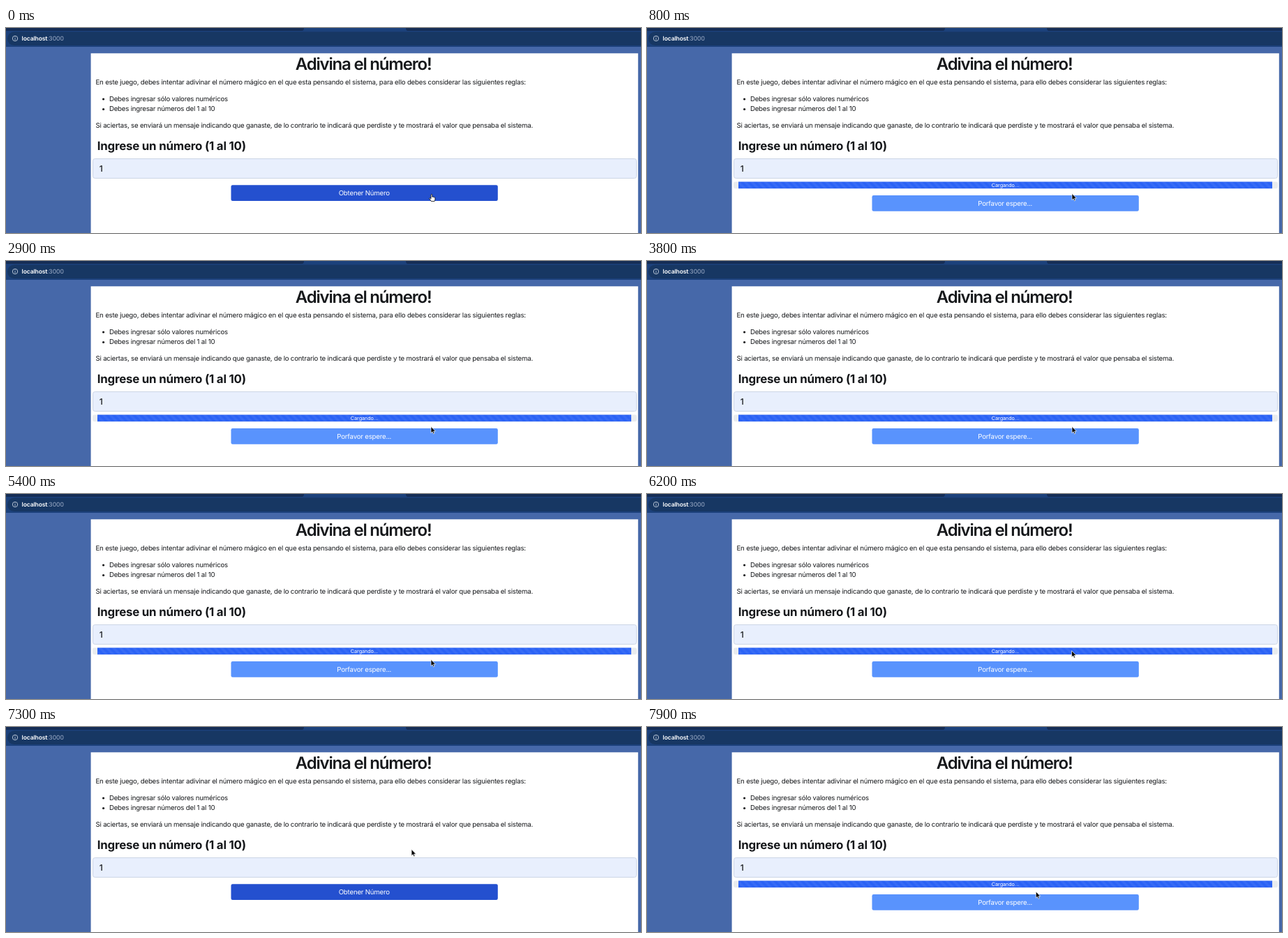
Recreate the animation shown at these times as an HTML page. Size 910 by 294 pixels, loop 8000 ms.

```html
<!DOCTYPE html>
<html lang="es">
<head>
<meta charset="utf-8">
<title>Adivina el número</title>
<style>
  html, body { margin: 0; width: 100%; height: 100%; overflow: hidden; background: #4668a9; }
  svg { display: block; width: 910px; height: 294px; }
  text {
    font-family: Inter, "Liberation Sans", sans-serif;
    font-size: 9.67px; letter-spacing: -.2px; fill: #16181b;
    font-optical-sizing: none; text-rendering: geometricPrecision;
  }
  .title { font-size: 24px; font-weight: 600; letter-spacing: -1.2px; }
  .label { font-size: 16.9px; font-weight: 700; letter-spacing: -.23px; }
  .value { font-size: 12.1px; font-weight: 500; }
  .white { fill: #fff; }
  .small { font-size: 7.25px; letter-spacing: -.07px; }
  .url { font-size: 8.6px; letter-spacing: -.15px; }
  .host { fill: #fff; font-weight: 600; }
  .port { fill: #a3b2cc; letter-spacing: .04px; }
</style>
</head>
<body>
<svg viewBox="0 0 910 294">
  <defs>
    <pattern id="stripes" width="9.67" height="9.67" patternUnits="userSpaceOnUse">
      <path d="M0 0L9.67 9.67H4.835L0 4.835ZM4.835 0H9.67V4.835Z" fill="#fff" fill-opacity=".055"/>
    </pattern>
  </defs>

  <!-- browser bar -->
  <rect width="910" height="27" fill="#1c417b"/>
  <rect width="910" height="4" fill="#152d55"/>
  <path d="M424 4Q427 4 427 0H573Q573 4 576 4Z" fill="#1c417b"/>
  <rect x="2" y="5.5" width="920" height="19.5" rx="9.7" fill="#173763"/>
  <g fill="none" stroke="#c3cede" stroke-width=".9">
    <circle cx="13" cy="15" r="3.7"/>
    <path d="M13 14.4V17.2M13 12.6V13.5"/>
  </g>
  <text class="url host" x="22.6" y="18">localhost</text>
  <text class="url port" x="58.8" y="18">:3000</text>

  <!-- page -->
  <rect x="121.6" y="36.3" width="784.2" height="258" fill="#fff"/>
  <text class="title" x="414.8" y="59.6">Adivina el número!</text>
  <text x="128.5" y="80.6">En este juego, debes intentar adivinar el número mágico en el que esta pensando el sistema, para ello debes considerar las siguientes reglas:</text>
  <circle cx="139.6" cy="102" r="1.6" fill="#16181b"/>
  <text x="147.9" y="104.9">Debes ingresar sólo valores numéricos</text>
  <circle cx="139.6" cy="116.5" r="1.6" fill="#16181b"/>
  <text x="147.9" y="119.4">Debes ingresar números del 1 al 10</text>
  <text x="128.5" y="143.3">Si aciertas, se enviará un mensaje indicando que ganaste, de lo contrario te indicará que perdiste y te mostrará el valor que pensaba el sistema.</text>
  <text class="label" x="130.7" y="175.4">Ingrese un número (1 al 10)</text>
  <rect x="124.5" y="187.5" width="779" height="28" rx="3" fill="#e8effd" stroke="#ccd5e6"/>
  <text class="value" x="133.8" y="205.6">1</text>

  <g id="ready">
    <rect x="322.5" y="225.3" width="382.3" height="22.8" rx="2.3" fill="#2450cf"/>
    <text class="white" x="513.3" y="240.4" text-anchor="middle">Obtener Número</text>
  </g>

  <g id="loading">
    <rect x="124" y="220.5" width="780" height="9.7" rx="2.4" fill="#e9ecef"/>
    <rect x="131" y="220.5" width="765" height="9.7" fill="#2a62f5"/>
    <rect x="131" y="220.5" width="765" height="9.7" fill="url(#stripes)"/>
    <text class="white small" x="513.4" y="228" text-anchor="middle">Cargando...</text>
    <rect x="322.5" y="240" width="382.3" height="22.8" rx="2.3" fill="#5993fd"/>
    <text class="white" x="513.2" y="255" text-anchor="middle">Porfavor espere...</text>
  </g>

  <g id="pointer">
    <path id="arrow" d="M0 0V9.2L2.1 7.3L3.5 10.4L5 9.7L3.7 6.7H6.6Z" fill="#000" stroke="#fff" stroke-width=".7"/>
    <path id="hand" d="M0 1.8Q0 1 .9 1T1.8 1.8V4.8Q2.5 4.2 3.2 5Q4.1 4.4 4.7 5.3Q5.9 5 5.9 6.3V8.1Q5.9 9.3 5.1 11H.3Q-.7 9 -2.3 7.3Q-2.4 6.1 -1.3 6.3L0 7.3Z" fill="#fff" stroke="#000" stroke-width=".75"/>
  </g>
</svg>
<script>
const LOOP = 8000, STEP = 100, TILE = 9.67;
const $ = id => document.getElementById(id);
const show = (id, on) => $(id).setAttribute("display", on ? "inline" : "none");

// pointer stops: time, x, y
const stops = [
  [0, 609, 237.5], [6100, 609, 237.5],
  [6600, 604.8, 115], [7100, 604.8, 115],
  [7500, 557.3, 236], [LOOP, 557.3, 236]
];

function pointerAt(t) {
  const i = stops.findIndex(s => s[0] > t);
  const [t0, x0, y0] = stops[i - 1], [t1, x1, y1] = stops[i];
  const u = (t - t0) / (t1 - t0), k = u * u * (3 - 2 * u);
  return [x0 + (x1 - x0) * k, y0 + (y1 - y0) * k];
}

function draw(t) {
  const loading = (t >= 300 && t < 6700) || t >= 7700;
  const [x, y] = pointerAt(t);
  const over = !loading && x > 322 && x < 705 && y > 225 && y < 248;
  show("ready", !loading);
  show("loading", loading);
  show("arrow", !over);
  show("hand", over);
  $("pointer").setAttribute("transform", `translate(${x} ${y})`);
  const shift = TILE * (1 - t % 1000 / 1000);
  $("stripes").setAttribute("patternTransform", `translate(${131 + shift} 220.5)`);
}

const start = performance.now();
function tick() {
  const t = (performance.now() - start) % LOOP;
  draw(Math.floor(t / STEP) * STEP);
  requestAnimationFrame(tick);
}
tick();
</script>
</body>
</html>
```
